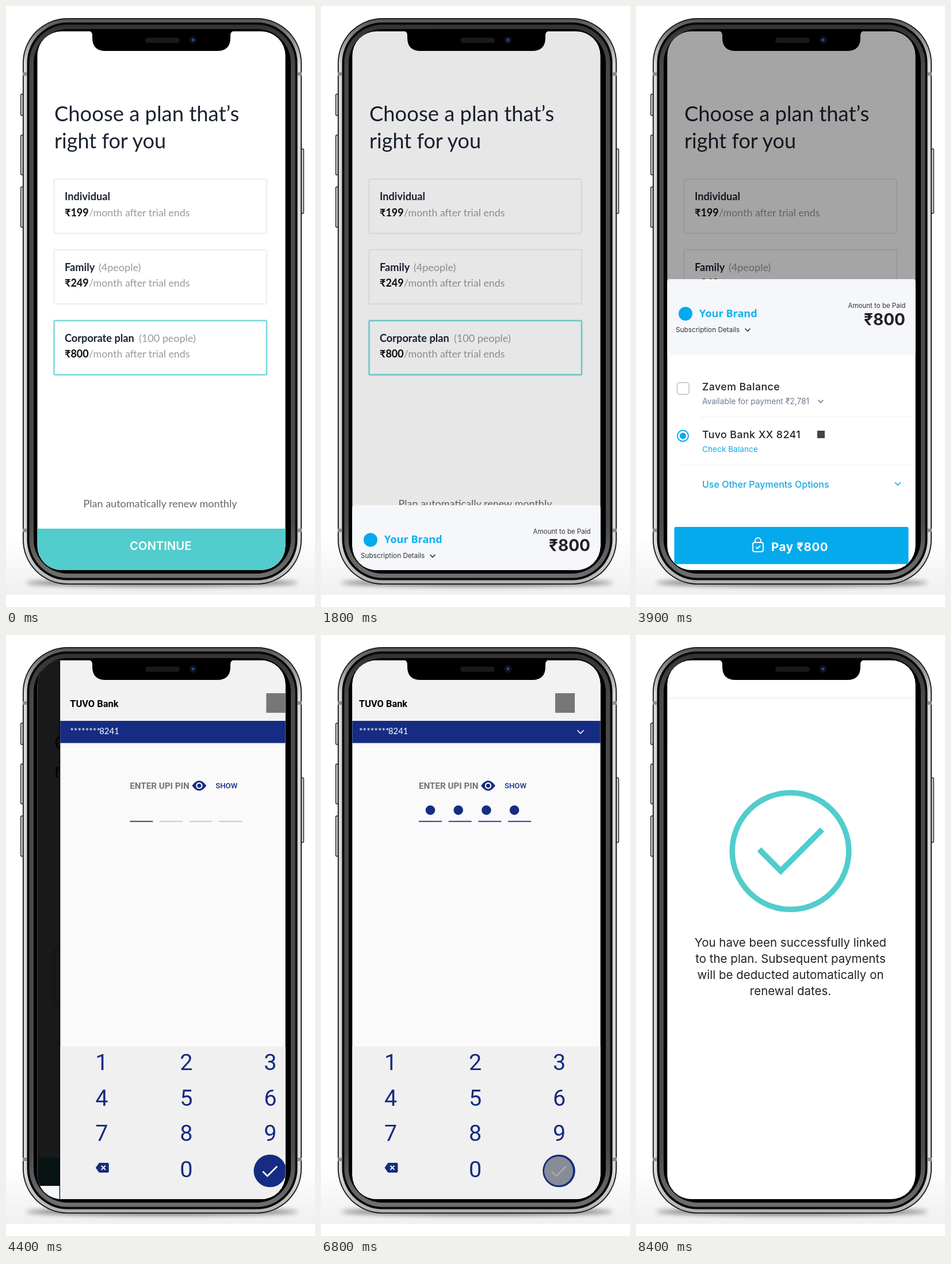
An HTML page for the animation above (8500 ms loop, 537 by 1043 pixels).

```html
<!DOCTYPE html>
<html lang="en">
<head>
<meta charset="utf-8">
<title>Plan checkout</title>
<style>
html, body { margin: 0; width: 100%; height: 100%; overflow: hidden; background: #fff; }
svg { display: block; width: 537px; height: 1043px; }
text { white-space: pre; }
.lato { font-family: Lato, "Noto Sans", sans-serif; }
.inter { font-family: Inter, "Noto Sans", sans-serif; }
.roboto { font-family: Roboto, "Noto Sans", sans-serif; }
.noto { font-family: "Noto Sans", sans-serif; }
</style>
</head>
<body>
<svg id="stage" viewBox="0 0 537 1043" xmlns="http://www.w3.org/2000/svg"></svg>
<script>
const LOOP = 8500;
const TEAL = '#52cccc', NAVY = '#152c82', SKY = '#05aaed', INK = '#1b2233';

const text = (str, x, y, size, fill, font, extra = '') =>
  `<text class="${font}" x="${x}" y="${y}" font-size="${size}" fill="${fill}" ${extra}>${str}</text>`;
const rect = (x, y, w, h, fill, extra = '') =>
  `<rect x="${x}" y="${y}" width="${w}" height="${h}" fill="${fill}" ${extra}/>`;
const line = (d, stroke, width, extra = '') =>
  `<path d="${d}" fill="none" stroke="${stroke}" stroke-width="${width}" ${extra}/>`;
const circle = (x, y, r, fill, extra = '') =>
  `<circle cx="${x}" cy="${y}" r="${r}" fill="${fill}" ${extra}/>`;
const chevron = (x, y, color, w = 4.5) =>
  line(`M${x - w} ${y - w / 2}l${w} ${w}l${w} ${-w}`, color, 1.6);

const BOLD = 'font-weight="700"', MEDIUM = 'font-weight="500"';
const MIDDLE = 'text-anchor="middle"', END = 'text-anchor="end"';

function backdrop() {
  return rect(0, 920, 537, 102, 'url(#floor)') +
    '<ellipse cx="271" cy="1001" rx="236" ry="6" fill="#000" opacity=".55" filter="url(#blur)"/>';
}

function phoneBody() {
  const button = (x, y, h) => rect(x, y, 6, h, '#c9c9c9', 'rx="2" stroke="#222" stroke-width="1.3"');
  const shell = (inset, fill) => rect(29 + inset, 21 + inset, 485 - 2 * inset, 983 - 2 * inset,
    fill, `rx="${78 - inset}"`);
  const antenna = [118, 910].map(y => rect(29, y - 3, 7, 6, '#8d8d8d') + rect(507, y - 3, 7, 6, '#8d8d8d')).join('');
  return button(25.6, 153, 37) + button(25.6, 224, 69) + button(25.6, 314, 70) + button(511.4, 248, 112) +
    shell(0, '#151515') + shell(1.8, 'url(#metal)') + antenna +
    shell(7.5, '#080808') + shell(11.5, 'url(#rim)') + shell(19, '#000');
}

function notch() {
  return '<path d="M143 43q7 1 7 8v4q0 23 23 23H367q23 0 23-23v-4q0-7 7-8z" fill="#000"/>' +
    rect(242, 55, 60, 9, '#191919', 'rx="4.5"') +
    circle(325, 59, 6.5, '#10131c') + circle(325, 59, 2.4, '#244a9c');
}

function planScreen() {
  const card = (y, title, note, noteX, price, active) =>
    rect(83.5, y, 369.5, 94, 'none',
      active ? `rx="2" stroke="${TEAL}" stroke-width="5" opacity=".16"` : 'rx="2" stroke="#000" stroke-width="4" opacity=".02"') +
    rect(83.5, y, 369.5, 94, 'none',
      active ? `rx="2" stroke="${TEAL}" stroke-width="1.5"` : 'rx="2" stroke="#000" stroke-opacity=".09"') +
    text(title, 102, y + 36.5, 18.2, INK, 'lato', BOLD) +
    text(note, noteX, y + 36.5, 18, '#999', 'lato') +
    text(price, 102, y + 64, 18, '#0b0b0b', 'lato', BOLD) +
    text('/month after trial ends', 144, y + 64, 17.8, '#999', 'lato');
  return rect(48, 40, 442, 945, '#fff') +
    text('Choose a plan that’s', 84, 200, 36.4, INK, 'lato') +
    text('right for you', 84, 247, 36, INK, 'lato') +
    card(300.5, 'Individual', '', 0, '₹199') +
    card(423, 'Family', '(4people)', 161, '₹249') +
    card(546, 'Corporate plan', '(100 people)', 231, '₹800', true) +
    text('Plan automatically renew monthly', 268, 870, 18, '#666', 'lato', MIDDLE) +
    rect(48, 907, 442, 78, TEAL) +
    text('CONTINUE', 268.7, 944.3, 20.3, '#fff', 'inter', `font-weight="600" ${MIDDLE}`);
}

// Drawn at its open position, top edge at y = 474.
function paymentSheet() {
  const row = 'font-weight="500" letter-spacing=".4"';
  return rect(54, 474, 432, 520, '#fff', 'rx="5"') +
    '<path d="M54 606V479q0-5 5-5H481q5 0 5 5V606z" fill="#f5f7fb"/>' +
    circle(86, 534, 12, SKY) +
    text('Your Brand', 110, 539.5, 18.1, '#0bb3ee', 'noto', BOLD) +
    text('Subscription Details', 69, 566, 11.8, '#333', 'inter') +
    chevron(194, 562, '#333') +
    text('Amount to be Paid', 468.5, 524, 11.5, '#333', 'inter', END) +
    text('₹800', 468, 554, 28, '#222', 'inter', `${BOLD} ${END}`) +
    rect(71.5, 653.5, 20.5, 20.5, '#fff', 'rx="4" stroke="#bbb" stroke-width="1.4"') +
    text('Zavem Balance', 115, 667, 17.8, '#222', 'inter', row) +
    text('Available for payment ₹2,781', 115, 691, 13.8, '#6f7c93', 'inter') +
    chevron(321, 686, '#6f7c93') +
    rect(113, 712.5, 373, 1, '#ededed') +
    circle(81.5, 746, 9.5, '#fff', `stroke="${SKY}" stroke-width="2"`) + circle(81.5, 746, 5.5, SKY) +
    text('Tuvo Bank', 115, 749.5, 17.8, '#222', 'inter', row) +
    text('XX 8241', 213, 749.5, 17.8, '#222', 'inter', row) +
    rect(315, 737, 13, 13, '#444') +
    text('Check Balance', 115, 774, 13.7, '#14a8e2', 'inter') +
    rect(78, 796.5, 408, 1, '#ededed') +
    text('Use Other Payments Options', 115, 836, 16, '#14a8e2', 'inter', MEDIUM) +
    chevron(455, 829, '#14a8e2', 5) +
    rect(66.5, 904, 407, 64.5, SKY, 'rx="3"') +
    rect(203, 931, 18, 16, 'none', 'rx="3" stroke="#fff" stroke-width="1.8"') +
    line('M207 931v-3a5 5 0 0 1 10 0v3M208.5 939l2.5 2.5l5-5', '#fff', 1.8) +
    text('Pay ₹800', 235, 946, 20.5, '#fff', 'inter', `${BOLD} letter-spacing=".6"`);
}

function pinScreen() {
  const columns = [121, 268, 414], rows = [755, 817, 878];
  const keys = rows.map((y, r) => columns.map((x, c) =>
    text(3 * r + c + 1, x, y, 39.5, NAVY, 'roboto', MIDDLE)).join('')).join('');
  const slots = [0, 1, 2, 3].map(i =>
    `<rect class="slot" x="${170 + 51.7 * i}" y="322.6" width="40" height="1.8"/>` +
    circle(190 + 48.7 * i, 304, 8.3, NAVY, 'class="dot"')).join('');
  return rect(47.5, 40, 2, 945, '#000') + rect(49, 40, 450, 945, '#fafafa') +
    rect(49, 40, 450, 109, '#f2f2f2') +
    text('TUVO Bank', 66, 125, 16.4, '#000', 'roboto', BOLD) +
    rect(407, 101, 34, 34, '#777') +
    rect(49, 149, 450, 38.5, NAVY) +
    text('********', 66, 172, 15.5, '#fff', 'lato') + text('8241', 117, 172, 14.8, '#fff', 'lato') +
    chevron(451, 168, '#fff', 5.5) +
    text('ENTER UPI PIN', 170, 267, 15.2, '#757575', 'roboto', BOLD) +
    `<path d="M278 261.5q12.5-17.5 25 0q-12.500 17.500-25 0z" fill="${NAVY}"/>` +
    circle(290.5, 261.5, 4.6, NAVY, 'stroke="#fff" stroke-width="2.2"') +
    text('SHOW', 319, 266, 13.2, NAVY, 'roboto', MEDIUM) +
    slots + rect(49, 714, 450, 271, '#f0f0f0') + keys +
    text('0', 268, 941, 39.5, NAVY, 'roboto', MIDDLE) +
    `<path d="M110.500 924.500l6-8.500H131.500q2 0 2 2v13q0 2-2 2H116.500z" fill="${NAVY}"/>` +
    line('M120.500 921l7 7m0-7l-7 7', '#fff', 1.8) +
    circle(413.5, 930, 28.3, NAVY) + line('M401 931l8 8l17-17', '#fff', 2.6);
}

function successScreen() {
  const message = ['You have been successfully linked', 'to the plan. Subsequent payments',
    'will be deducted automatically on', 'renewal dates.'];
  return rect(48, 40, 450, 945, '#fff') + rect(48, 109, 450, 1.2, '#e9e9e9') +
    circle(268.5, 375, 101.3, 'none', `stroke="${TEAL}" stroke-width="9.6"`) +
    line('M214 372L251.500 409.500L323.500 337.500', TEAL, 10) +
    message.map((s, i) => text(s, 268.5, 541 + 28 * i, 20.5, '#222', 'inter', MIDDLE)).join('');
}

const shade = id => rect(48, 40, 442, 945, '#000', `id="${id}"`);
const stage = document.getElementById('stage');
stage.innerHTML = `<defs>
  <clipPath id="screen">${rect(54.5, 44, 431, 935, '#000', 'rx="42"')}</clipPath>
  <filter id="blur" x="-10%" y="-300%" width="120%" height="700%"><feGaussianBlur stdDeviation="4"/></filter>
  <linearGradient id="floor" x2="0" y2="1"><stop stop-color="#fff"/><stop offset="1" stop-color="#f0f0f0"/></linearGradient>
  <linearGradient id="metal" x2="0" y2="1"><stop stop-color="#555"/><stop offset=".08" stop-color="#d8d8d8"/>
    <stop offset=".93" stop-color="#d8d8d8"/><stop offset="1" stop-color="#b0b0b0"/></linearGradient>
  <linearGradient id="rim" x2="0" y2="1"><stop stop-color="#333"/><stop offset=".08" stop-color="#4a4a4a"/>
    <stop offset=".9" stop-color="#4a4a4a"/><stop offset="1" stop-color="#707070"/></linearGradient>
</defs>
${backdrop()}${phoneBody()}
<g clip-path="url(#screen)">
  ${planScreen()}${shade('sheetShade')}${shade('pinShade')}
  <g id="sheet">${paymentSheet()}</g>
  <g id="pin">${pinScreen()}</g>
  ${shade('doneShade')}
  <g id="done">${successScreen()}</g>
  ${circle(0, 0, 31.3, '#9d9d9d', 'id="touch"')}
</g>${notch()}`;

const part = Object.fromEntries(['sheetShade', 'pinShade', 'sheet', 'pin', 'doneShade', 'done', 'touch']
  .map(id => [id, document.getElementById(id)]));
const dots = [...stage.querySelectorAll('.dot')], slots = [...stage.querySelectorAll('.slot')];

const span = (t, from, to) => Math.min(1, Math.max(0, (t - from) / (to - from)));
const ease = p => p < .5 ? 2 * p * p : 1 - 2 * (1 - p) ** 2;
const smooth = p => p * p * (3 - 2 * p);
const mix = (a, b, p) => a + (b - a) * p;

const TAPS = [5950, 6150, 6350, 6550];
// Touch path: time, x, y, opacity, scale
const TOUCH = [
  [450, 268, 593, 0, 1], [650, 268, 593, .85, 1], [1150, 268, 937, .85, 1],
  [1300, 268, 937, .85, .8], [1450, 268, 937, .85, 1], [1600, 268, 937, 0, 1],
  [2700, 270, 700, 0, 1], [2900, 270, 700, .85, 1], [3450, 270, 937, .85, 1],
  [3600, 270, 937, .85, .8], [3750, 270, 937, .85, 1], [3900, 270, 937, 0, 1],
  [5400, 274, 644, 0, 1], [5550, 274, 644, .85, 1], [5700, 274, 644, .85, 1],
  [5900, 268, 742, .85, 1], [5950, 268, 742, .85, .8], [6100, 268, 804, .85, 1],
  [6150, 268, 804, .85, .8], [6300, 268, 865, .85, 1], [6350, 268, 865, .85, .8],
  [6500, 268, 928, .85, 1], [6550, 268, 928, .85, .8], [6720, 413, 930, .85, 1],
  [6800, 413, 930, .85, .8], [6900, 413, 930, 0, 1]
];

function touchAt(t) {
  const next = TOUCH.findIndex(k => k[0] > t);
  if (next < 1) return [0, 0, 0, 1];
  const a = TOUCH[next - 1], b = TOUCH[next];
  const p = ease(span(t, a[0], b[0]));
  return a.slice(1).map((v, i) => mix(v, b[i + 1], p));
}

function slide(node, shadeNode, p) {
  node.setAttribute('transform', `translate(${442 * (1 - p)} 0)`);
  node.setAttribute('visibility', p > 0 ? 'visible' : 'hidden');
  shadeNode.setAttribute('opacity', p);
}

function draw(t) {
  const leave = ease(span(t, 3950, 4483));
  const open = ease(span(t, 1600, 2200)) - leave;
  part.sheet.setAttribute('transform', `translate(0 ${506 * (1 - open)})`);
  part.sheetShade.setAttribute('opacity', .353 * (smooth(span(t, 1600, 2200)) - leave));
  slide(part.pin, part.pinShade, ease(span(t, 3960, 4530)));
  slide(part.done, part.doneShade, ease(span(t, 6900, 7500)));

  const typed = TAPS.filter(tap => t >= tap).length;
  dots.forEach((dot, i) => dot.setAttribute('opacity', i < typed ? 1 : 0));
  slots.forEach((slot, i) => slot.setAttribute('fill', i < typed ? NAVY : i === typed ? '#333' : '#c6c6c6'));

  const [x, y, opacity, scale] = touchAt(t);
  part.touch.setAttribute('transform', `translate(${x} ${y}) scale(${scale})`);
  part.touch.setAttribute('opacity', opacity);
}

const start = performance.now();
function tick() {
  draw((performance.now() - start) % LOOP);
  requestAnimationFrame(tick);
}
tick();
</script>
</body>
</html>
```
